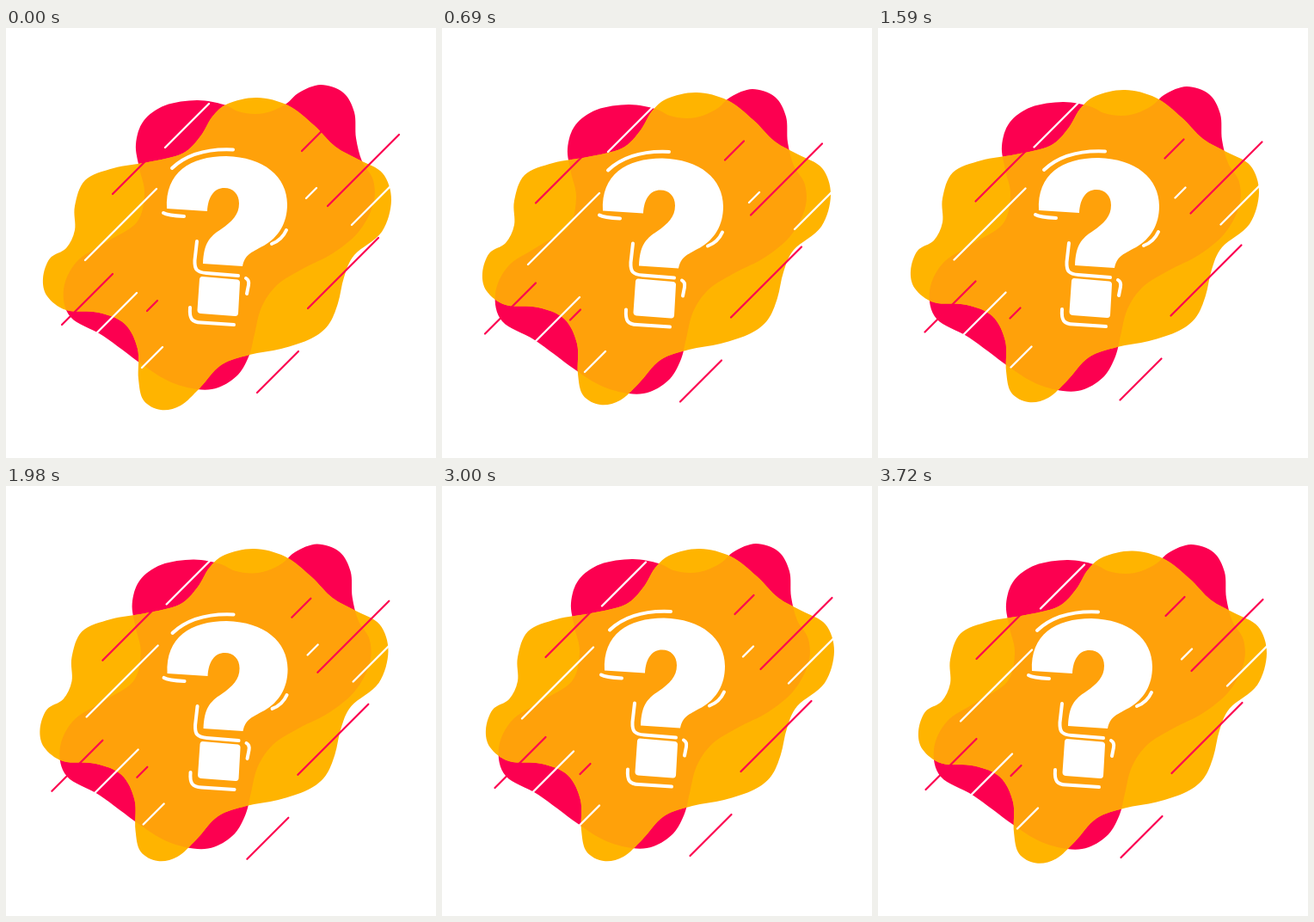
An HTML page with a canvas for the animation above (3750 ms loop, 500 by 500 pixels).

```html
<!DOCTYPE html>
<html lang="en">
<head>
<meta charset="utf-8">
<title>Question mark</title>
<style>
  html, body { margin: 0; width: 100%; height: 100%; overflow: hidden; background: #fff; }
  canvas { display: block; width: 500px; height: 500px; }
</style>
</head>
<body>
<canvas id="stage" width="500" height="500"></canvas>
<script>
const LOOP = 3750, STEP = 30;
const PINK = '#fc0050', YELLOW = '#ffb400', ORANGE = '#ffa10a', WHITE = '#fff';
const ctx = document.getElementById('stage').getContext('2d');

// Closed smooth curve through a flat list of x, y pairs.
function blob(coords) {
  const n = coords.length / 2;
  const at = i => { const k = (i + n) % n * 2; return [coords[k], coords[k + 1]]; };
  const path = new Path2D();
  path.moveTo(...at(0));
  for (let i = 0; i < n; i++) {
    const [a, b, c, d] = [at(i - 1), at(i), at(i + 1), at(i + 2)];
    path.bezierCurveTo(
      b[0] + (c[0] - a[0]) / 6, b[1] + (c[1] - a[1]) / 6,
      c[0] - (d[0] - b[0]) / 6, c[1] - (d[1] - b[1]) / 6, c[0], c[1]);
  }
  path.closePath();
  return path;
}

// Diagonal strokes at 45 degrees: top-right corner and horizontal extent.
function strokes(list) {
  const path = new Path2D();
  for (const [x, y, size] of list) {
    path.moveTo(x, y);
    path.lineTo(x - size, y + size);
  }
  return path;
}

const yellowBlob = blob([
  292, 81, 328, 90, 358, 113, 383, 138, 410, 153, 438, 169, 448, 200, 437, 237,
  405, 264, 393, 290, 386, 320, 375, 345, 355, 361, 320, 373, 283, 380, 250, 392,
  225, 419, 203, 439, 180, 444, 160, 433, 154, 408, 153, 373, 138, 344, 108, 331,
  70, 328, 48, 312, 43, 291, 51, 268, 70, 256, 80, 235, 80, 207, 92, 177,
  125, 163, 165, 156, 205, 146, 226, 126, 240, 103, 258, 88]);

const pinkBlob = blob([
  253, 89, 222, 84, 185, 90, 160, 108, 151, 135, 155, 163, 161, 192, 152, 226,
  115, 250, 82, 272, 67, 304, 75, 336, 113, 358, 158, 391, 190, 411, 222, 420,
  247, 418, 270, 403, 283, 380, 289, 356, 297, 325, 315, 299, 345, 280, 380, 262,
  410, 237, 427, 205, 427, 177, 414, 155, 407, 128, 405, 98, 392, 75, 366, 66,
  341, 75, 326, 88, 308, 97, 290, 100, 270, 97]);

const pinkLines = strokes([
  [457, 124, 83], [366, 121, 22], [185, 132, 61], [124, 286, 59],
  [176, 317, 12], [433, 244, 82], [340, 376, 48]]);

const whiteLines = strokes([
  [236, 88, 51], [175, 187, 83], [152, 308, 76], [182, 371, 24],
  [462, 169, 60], [361, 186, 12]]);

const questionFill = new Path2D(`
  M187 210 C185 168 214 149 256 149 C300 150 327 173 327 205
  C327 227 317 243 300 253 C283 262 278 264 275 277 L229 274
  C230 251 236 243 250 234 C263 225 271 217 271 204
  C271 193 264 186 254 186 C242 186 235 196 234 213 Z
  M228 289 L269 292.5 Q272 293 272 296 L270 332 Q269.500 335.500 266 335
  L226 332 Q222.500 331.500 222.500 328 L225 292 Q225.500 289 228 289 Z`);

const questionAccents = new Path2D(`
  M193 163 C210 147 232 140 264 141.500
  M183 215 Q188 218 207 219
  M326 235 C322 244 317 248 309 251
  M222 248 L219.500 270 C219 281 222 284 233 285 L270 288
  M279 291 Q283 293 282 299 L280 309
  M214 325 C213 338 216 342 227 342.500 L265 345`);

// Drift of each layer: time, x, y.
const drift = {
  pink: [[0, 0, 0], [690, -5, 5], [1050, -7, 3], [1590, -7, 2], [1950, -4.5, 1.5],
    [2310, -2, 3.5], [2660, -1, 0.5], [3000, -1, 1], [3400, -1, -2], [3720, -2, 2]],
  yellow: [[0, 0, 0], [690, 4, -6], [1050, -3, -6.5], [1590, -5, -9],
    [2310, -1, -7], [3000, 8, -8], [3400, 6, -2.5], [3720, 4, -5.5]],
  pinkLines: [[0, 0, 0], [690, -15, 10.5], [1050, -5, 11], [1590, -10.5, 8.5],
    [2310, -11, 10.5], [3000, -3.5, 6], [3720, -9.5, 8]],
  whiteLines: [[0, 0, 0], [690, 8, 5], [1050, 4, 4], [1590, -3.5, -0.5],
    [2310, 6, -1.5], [3000, 1, 0.5], [3720, 4, 3.5]],
  question: [[0, 0, 0], [690, 0, 2.5], [1050, -1, 4], [1590, 0, 2],
    [2310, 1, 12], [3000, 2, 4.5], [3720, -8, 5]]
};

// Cubic Hermite interpolation with central-difference slopes.
function offset(keys, t) {
  let i = 0;
  while (i < keys.length - 2 && t >= keys[i + 1][0]) i++;
  const a = keys[i], b = keys[i + 1];
  const before = keys[i - 1] || a, after = keys[i + 2] || b;
  const span = b[0] - a[0], u = (t - a[0]) / span, v = 1 - u;
  return [1, 2].map(k => {
    const slopeA = (b[k] - before[k]) / (b[0] - before[0]) * span;
    const slopeB = (after[k] - a[k]) / (after[0] - a[0]) * span;
    return v * v * (1 + 2 * u) * a[k] + u * u * (3 - 2 * u) * b[k]
      + u * v * v * slopeA - u * u * v * slopeB;
  });
}

function layer(name, t, draw) {
  ctx.save();
  ctx.translate(...offset(drift[name], t));
  draw();
  ctx.restore();
}

function fill(path, color) {
  ctx.fillStyle = color;
  ctx.fill(path);
}

function stroke(path, color, width, cap) {
  ctx.strokeStyle = color;
  ctx.lineWidth = width;
  ctx.lineCap = cap;
  ctx.stroke(path);
}

function render(t) {
  fill(new Path2D('M0 0H500V500H0Z'), WHITE);
  layer('pink', t, () => fill(pinkBlob, PINK));
  layer('yellow', t, () => fill(yellowBlob, YELLOW));

  // The overlap of both blobs is orange.
  const [x, y] = offset(drift.yellow, t);
  ctx.save();
  ctx.translate(x, y);
  ctx.clip(yellowBlob);
  ctx.translate(-x, -y);
  layer('pink', t, () => fill(pinkBlob, ORANGE));
  ctx.restore();

  layer('pinkLines', t, () => stroke(pinkLines, PINK, 2.2, 'round'));
  layer('whiteLines', t, () => stroke(whiteLines, WHITE, 2.4, 'round'));
  layer('question', t, () => {
    fill(questionFill, WHITE);
    stroke(questionAccents, WHITE, 4, 'round');
  });
}

function tick() {
  render(Math.floor(performance.now() % LOOP / STEP) * STEP);
  requestAnimationFrame(tick);
}
tick();
</script>
</body>
</html>
```
